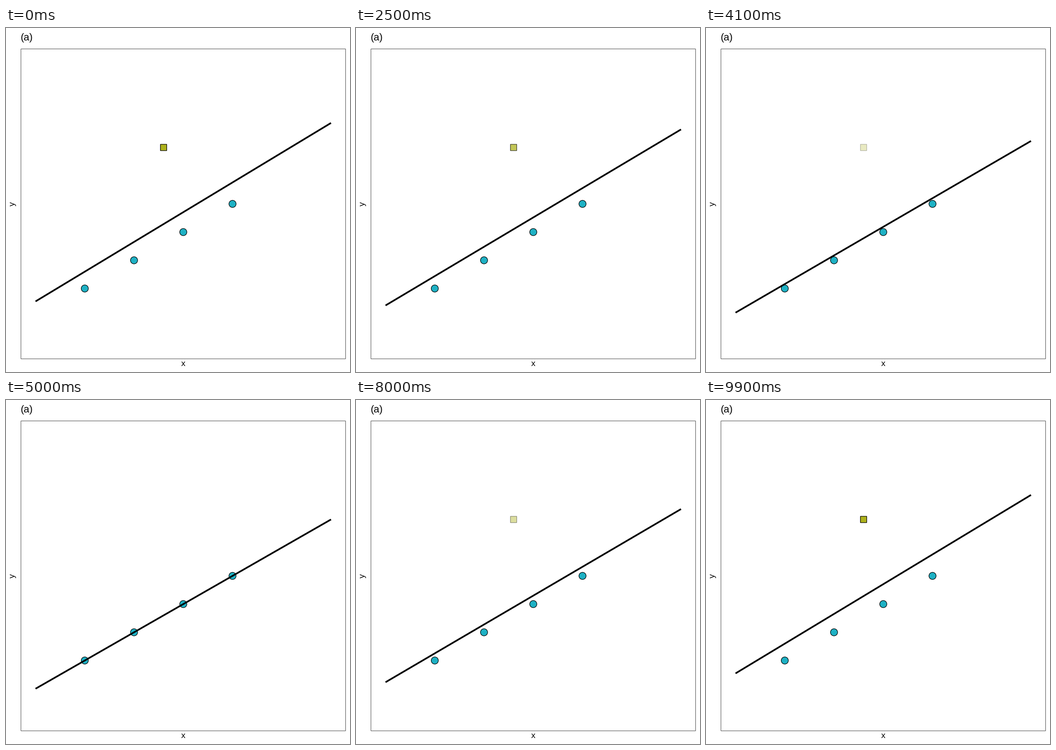
A matplotlib script that plays this animation: 748 px wide and 748 px high, repeating every 10 s.

```python
import numpy as np
import matplotlib.pyplot as plt
from matplotlib.animation import FuncAnimation
from matplotlib.patches import Circle, Rectangle

SIZE, DPI = 748, 128
PX = 72 / DPI  # points per pixel
LEFT, RIGHT, TOP, BOTTOM = 32.1, 738.83, 45.1, 719.8
TEAL, OLIVE = "#1eb1c4", "#aeb21d"
RADIUS, SIDE, STROKE = 7.75, 13.75, 1.2

plt.rcParams["font.family"] = "Liberation Sans"
plt.rcParams["text.hinting"] = "none"


def to_px(x, y):
    """Data (-0.3..6.3, -0.5..10.5) to stage pixels, y pointing down."""
    px = LEFT + (np.asarray(x) + 0.3) / 6.6 * (RIGHT - LEFT)
    py = BOTTOM - (np.asarray(y) + 0.5) / 11 * (BOTTOM - TOP)
    return px, py


fig = plt.figure(figsize=(SIZE / DPI, SIZE / DPI), dpi=DPI, facecolor="white")
ax = fig.add_axes([0, 0, 1, 1])
ax.set_xlim(0, SIZE)
ax.set_ylim(SIZE, 0)
ax.axis("off")

inset = 0.45
ax.add_patch(Rectangle((LEFT + inset, TOP + inset),
                       RIGHT - LEFT - 2 * inset, BOTTOM - TOP - 2 * inset,
                       fill=False, ec="#333333", lw=2 * inset * PX, snap=False))


def label(x, y, text, size, **kw):
    ax.text(x, y, text, fontsize=size * PX, color="black",
            va="baseline", rotation_mode="anchor", **kw)


label(LEFT, 27, "(a)", 22, ha="left")
label((LEFT + RIGHT) / 2, 735, "x", 18.33, ha="center")
label(19, (TOP + BOTTOM) / 2, "y", 18.33, ha="center", rotation=90)

# Four collinear points and one outlier
xs, ys = np.array([1, 2, 3, 4]), np.array([2, 3, 4, 5])
out_x, out_y = 2.6, 7

mark = dict(ec="black", lw=STROKE * PX, snap=False, zorder=2)
for cx, cy in zip(*to_px(xs, ys)):
    ax.add_patch(Circle((cx, cy), RADIUS, fc=TEAL, **mark))

ox, oy = to_px(out_x, out_y)
outlier = ax.add_patch(Rectangle((ox - SIDE / 2, oy - SIDE / 2), SIDE, SIDE,
                                 fc=OLIVE, **mark))

ends = np.array([0, 6])
fit_all = np.polyval(np.polyfit([*xs, out_x], [*ys, out_y], 1), ends)
fit_rest = np.polyval(np.polyfit(xs, ys, 1), ends)
line, = ax.plot([], [], color="black", lw=3.6 * PX,
                solid_capstyle="butt", zorder=3)


def update(i):
    # hold, fade out, hold, fade in
    w = np.interp(i, [0, 16, 50, 66, 99], [1, 1, 0, 0, 1])
    outlier.set_alpha(w)
    line.set_data(*to_px(ends, fit_rest + w * (fit_all - fit_rest)))
    return outlier, line


anim = FuncAnimation(fig, update, frames=100, interval=100,
                     repeat=True, repeat_delay=0, blit=False)
plt.show()
```
